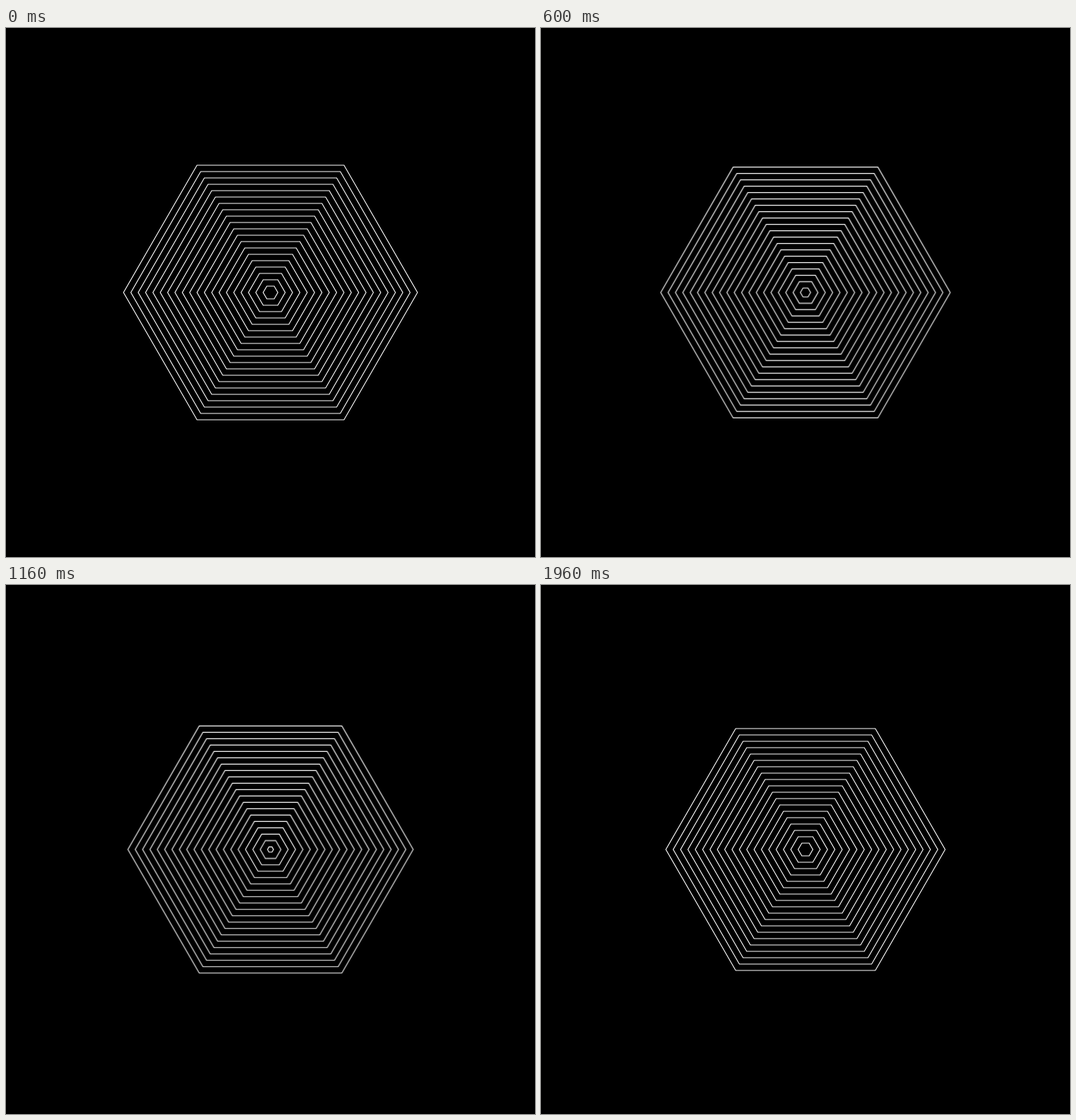
Recreate the animation shown at these times as an HTML page without scripts. Size 748 by 748 pixels, loop 2 s.

```html
<!DOCTYPE html>
<html lang="en">
<head>
<meta charset="utf-8">
<title>Sinking hexagons</title>
<style>
  html, body { margin: 0; width: 100%; height: 100%; overflow: hidden; background: #000; }
  svg { display: block; width: 100vw; height: 100vh; }
  /* one ring: apothem 9, drawn n times as large */
  path {
    d: path("M10.392 0 5.196 9H-5.196L-10.392 0-5.196-9H5.196Z");
    fill: none;
    stroke: #fff;
    stroke-width: 1.15px;
    vector-effect: non-scaling-stroke;
    animation: sink 2s steps(50, jump-none) infinite;
  }
  /* each ring shrinks to the size of its inner neighbour */
  @keyframes sink {
    from { transform: scale(var(--n)); }
    to { transform: scale(calc(var(--n) - 1)); }
  }
</style>
</head>
<body>
<svg viewBox="-374 -374 748 748">
  <path style="--n:1"/>
  <path style="--n:2"/>
  <path style="--n:3"/>
  <path style="--n:4"/>
  <path style="--n:5"/>
  <path style="--n:6"/>
  <path style="--n:7"/>
  <path style="--n:8"/>
  <path style="--n:9"/>
  <path style="--n:10"/>
  <path style="--n:11"/>
  <path style="--n:12"/>
  <path style="--n:13"/>
  <path style="--n:14"/>
  <path style="--n:15"/>
  <path style="--n:16"/>
  <path style="--n:17"/>
  <path style="--n:18"/>
  <path style="--n:19"/>
  <path style="--n:20"/>
</svg>
</body>
</html>
```
